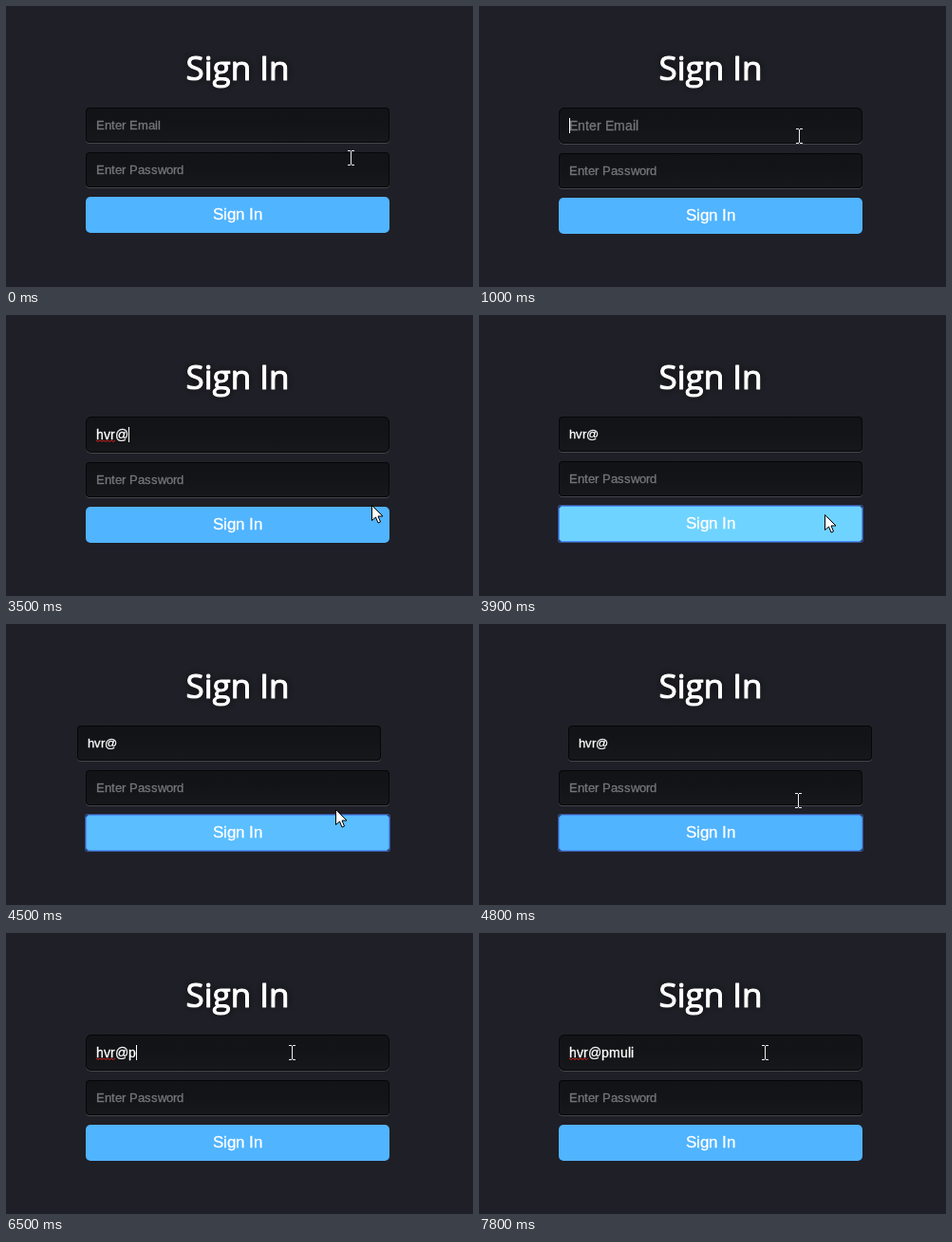
These frames come from a looping animation (492 by 296 pixels, 8000 ms). An HTML page with a canvas:

```html
<!DOCTYPE html>
<html lang="en">
<head>
<meta charset="utf-8">
<title>Sign In</title>
<style>
  html, body { margin: 0; width: 100%; height: 100%; overflow: hidden; background: #1f1f27; }
  canvas { display: block; }
</style>
</head>
<body>
<canvas id="stage" width="492" height="296"></canvas>
<script>
const ctx = document.getElementById('stage').getContext('2d');
const LOOP = 8000, TICK = 100;
const EMAIL = 'hvr@pmuli';
const LEFT = 84, WIDTH = 320;
const SANS = '"Liberation Sans", Arial, sans-serif';

// Times at which each further character of the address appears
const KEY_TIMES = [2300, 2400, 2600, 3100, 6500, 6700, 6800, 6900, 7200];
const FOCUS = [[900, 3800], [5500, LOOP]];
const CARET = [[900, 1500], [2100, 3600], [5500, 6000], [6500, 7800]];
// time, x, y of the pointer's hot spot
const POINTER = [
  [0, 363, 160], [500, 339, 140], [700, 337, 137], [3300, 337, 137],
  [3400, 366, 176], [3500, 385, 200], [3700, 364, 210], [4000, 364, 210],
  [4800, 336, 186], [5000, 328, 174], [5400, 301, 126], [LOOP, 301, 126]
];

const within = (t, spans) => spans.some(([a, b]) => t >= a && t < b);
const ramp = (t, a, b) => Math.min(1, Math.max(0, (t - a) / (b - a)));

function pointerAt(t) {
  const i = POINTER.findIndex(p => p[0] > t);
  const [a, x0, y0] = POINTER[i - 1], [b, x1, y1] = POINTER[i];
  const k = ramp(t, a, b);
  return [Math.round(x0 + (x1 - x0) * k), Math.round(y0 + (y1 - y0) * k)];
}

function shakeAt(t) {
  if (t < 4100 || t >= 5000) return 0;
  if (t >= 4900) return -4;
  return Math.floor(t / TICK) % 2 ? -9 : 10;
}

// Places every glyph on a whole pixel, slightly thickened, and returns the end of the line
function drawText(text, x, baseline, size, color) {
  ctx.font = `${size}px ${SANS}`;
  ctx.fillStyle = ctx.strokeStyle = color;
  ctx.lineWidth = 0.3;
  for (const glyph of text) {
    ctx.fillText(glyph, x, baseline);
    ctx.strokeText(glyph, x, baseline);
    x += Math.round(ctx.measureText(glyph).width);
  }
  return x;
}

function roundRect(x, y, w, h, r) {
  ctx.beginPath();
  ctx.roundRect(x, y, w, h, r);
}

function drawField(x, y, h, radius) {
  roundRect(x, y + 1, WIDTH, h, radius);
  ctx.fillStyle = '#45464c';
  ctx.fill();
  roundRect(x, y, WIDTH, h, radius);
  const shade = ctx.createLinearGradient(0, y, 0, y + h);
  shade.addColorStop(0, '#121316');
  shade.addColorStop(0.5, '#131417');
  shade.addColorStop(1, '#17181b');
  ctx.fillStyle = shade;
  ctx.fill();
  roundRect(x + 0.5, y + 0.5, WIDTH - 1, h - 1, radius - 0.5);
  ctx.strokeStyle = '#060608';
  ctx.lineWidth = 1;
  ctx.stroke();
}

function drawTitle() {
  ctx.save();
  ctx.font = '400 35px "Open Sans", sans-serif';
  ctx.textAlign = 'center';
  ctx.fillStyle = ctx.strokeStyle = '#fff';
  ctx.lineWidth = 1.1;
  ctx.lineJoin = 'round';
  ctx.shadowColor = '#000';
  ctx.shadowBlur = 10;
  ctx.fillText('Sign In', 244, 78);
  ctx.shadowColor = 'transparent';
  ctx.strokeText('Sign In', 244, 78);
  ctx.restore();
}

function drawSquiggle(x, end, y) {
  ctx.beginPath();
  ctx.moveTo(x, y);
  for (let i = 1; x + i * 2 <= end; i++) ctx.lineTo(x + i * 2, y + (i % 2) * 1.5);
  ctx.strokeStyle = '#d0201c';
  ctx.lineWidth = 1;
  ctx.stroke();
}

function drawEmail(t, focused) {
  const x = LEFT + shakeAt(t);
  const size = focused ? 14 : 13;
  const baseline = focused ? 131 : 130;
  const typed = EMAIL.slice(0, KEY_TIMES.filter(k => k <= t).length);
  drawField(x, 107, focused ? 38 : 37, focused ? 6 : 4);
  const end = drawText(typed || 'Enter Email', x + 11, baseline, size, typed ? '#fff' : '#75767a');
  if (focused && t >= 3100) drawSquiggle(x + 11, x + 31, 132);
  if (within(t, CARET)) {
    ctx.fillStyle = '#fff';
    ctx.fillRect(typed ? end : x + 11, 118, 1, 16);
  }
}

// A solid line on the button's edge with a fainter one around it
function drawFocusRing(y) {
  ctx.lineWidth = 1;
  ctx.strokeStyle = 'rgba(77, 144, 254, 0.5)';
  roundRect(LEFT - 0.5, y - 0.5, WIDTH + 1, 39, 2);
  ctx.stroke();
  ctx.strokeStyle = '#4d90fe';
  roundRect(LEFT + 0.5, y + 0.5, WIDTH - 1, 37, 3);
  ctx.stroke();
}

function drawButton(t, y) {
  const glow = ramp(t, 3500, 3800) * (1 - ramp(t, 4300, 4600));
  roundRect(LEFT, y, WIDTH, 38, 5);
  ctx.fillStyle = `rgb(${80 + 31 * glow}, ${180 + 31 * glow}, 255)`;
  ctx.fill();
  if (t >= 3800 && t < 5500) drawFocusRing(y);
  drawText('Sign In', 218, y + 24, 17, '#fff');
}

function drawBeam(x, y) {
  ctx.fillStyle = '#eee';
  ctx.fillRect(x, y - 7, 1, 14);
  for (const edge of [y - 8, y + 7]) {
    ctx.fillRect(x - 3, edge, 3, 1);
    ctx.fillRect(x + 1, edge, 3, 1);
  }
}

function drawArrow(x, y) {
  const outline = [[0, 0], [0, 16], [4, 12.5], [6.5, 18.5], [9, 17.5], [6.5, 11.5], [11.5, 11.5]];
  ctx.beginPath();
  for (const [dx, dy] of outline) ctx.lineTo(x + 0.5 + dx, y + 0.5 + dy);
  ctx.closePath();
  ctx.fillStyle = '#fff';
  ctx.fill();
  ctx.strokeStyle = '#000';
  ctx.lineWidth = 1;
  ctx.stroke();
}

function draw(t) {
  const focused = within(t, FOCUS);
  const drop = focused ? 1 : 0;
  const [x, y] = pointerAt(t);
  ctx.fillStyle = '#1f1f27';
  ctx.fillRect(0, 0, 492, 296);
  drawTitle();
  drawEmail(t, focused);
  drawField(LEFT, 154 + drop, 37, 4);
  drawText('Enter Password', 95, 177 + drop, 13, '#75767a');
  drawButton(t, 201 + drop);
  if (y > 192) drawArrow(x, y);
  else drawBeam(x, y);
}

function frame() {
  const t = performance.now() % LOOP;
  draw(Math.floor(t / TICK) * TICK);
  requestAnimationFrame(frame);
}
frame();
</script>
</body>
</html>
```
